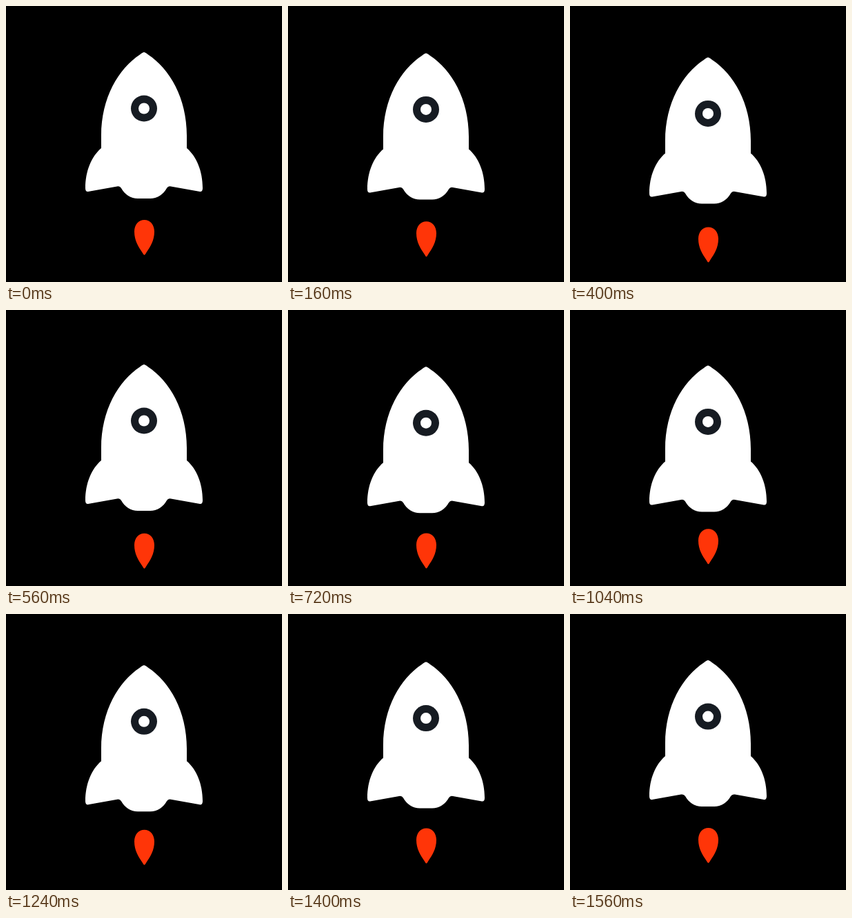
Animation, 400 px wide and 400 px high, one loop 1.6 s. Source, as an HTML page with a canvas:

```html
<!DOCTYPE html>
<html lang="en">
<head>
<meta charset="utf-8">
<title>Rocket</title>
<style>
  html, body { margin: 0; width: 100%; height: 100%; overflow: hidden; background: #000; }
  canvas { display: block; }
</style>
</head>
<body>
<canvas id="stage" width="400" height="400"></canvas>
<script>
const ctx = document.getElementById('stage').getContext('2d');
const LOOP = 1600, STEP = 40;

const hull = new Path2D(`M200 67 Q198 67 194 70.5
  C163 91 138 133 138 188 L138 206
  C124 218 115 239 115 264 Q115 269.5 119 269
  L161 261.5 Q165 260.5 167 264 C172 273 181 279 191 279
  L209 279 C219 279 228 273 233 264 Q235 260.5 239 261.5
  L281 269 Q285 269.5 285 264 C285 239 276 218 262 206
  L262 188 C262 133 237 91 206 70.5 Q202 67 200 67 Z`);

const flame = new Path2D(`M200.5 361 Q199.5 361 198 358
  C192 349 186 340 186 327 C186 317 192 310 200.5 310
  C209 310 215 317 215 327 C215 340 209 349 203 358
  Q201.5 361 200.5 361 Z`);

const ease = p => (1 - Math.cos(Math.PI * Math.min(1, Math.max(0, p)))) / 2;

// Sinks until `peak`, then rises back until `end`.
function bob(t, height, peak, end) {
  return height * (t < peak ? ease(t / peak) : 1 - ease((t - peak) / (end - peak)));
}

function disc(radius, color) {
  ctx.fillStyle = color;
  ctx.beginPath();
  ctx.arc(200, 148.5, radius, 0, 2 * Math.PI);
  ctx.fill();
}

function drawAt(dy, paint) {
  ctx.save();
  ctx.translate(0, dy);
  paint();
  ctx.restore();
}

function draw(t) {
  ctx.fillStyle = '#000';
  ctx.fillRect(0, 0, 400, 400);

  drawAt(bob(t, 14, 600, 1500), () => {
    ctx.fillStyle = '#ff3508';
    ctx.fill(flame);
  });

  drawAt(bob(t, 16, 840, LOOP), () => {
    ctx.fillStyle = '#fff';
    ctx.fill(hull);
    disc(19, '#161b22');
    disc(8, '#fff');
  });
}

function tick() {
  const t = performance.now() % LOOP;
  draw(Math.floor(t / STEP) * STEP);
  requestAnimationFrame(tick);
}
tick();
</script>
</body>
</html>
```
